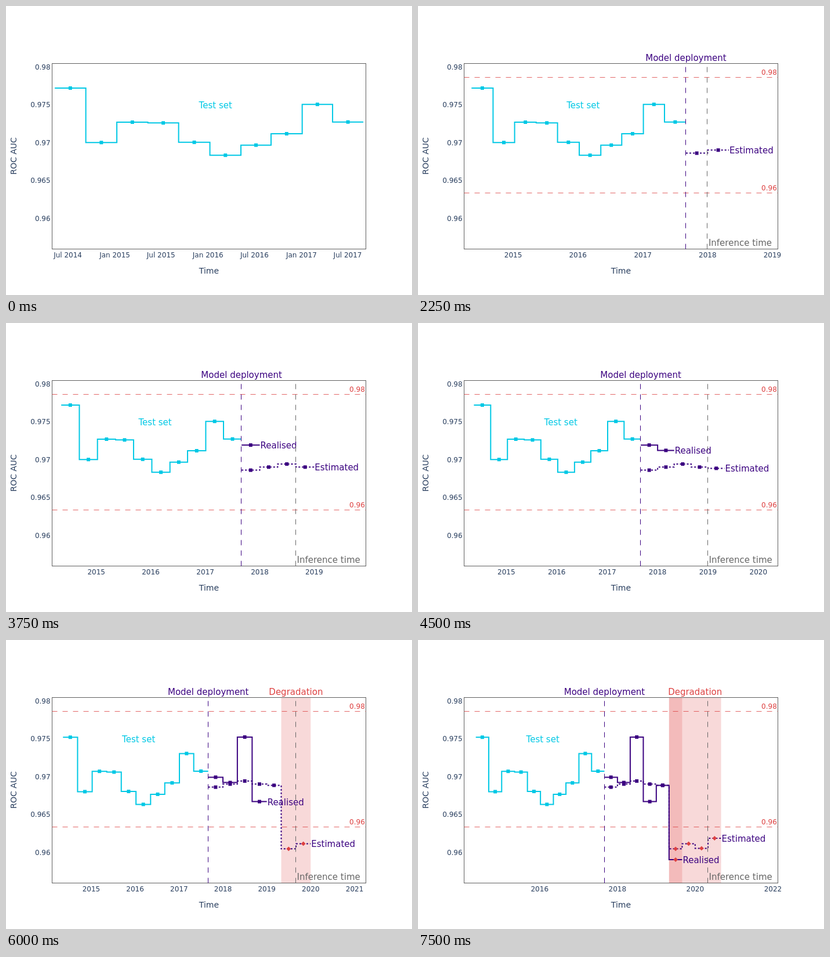
Animation of 700 by 500 pixels, one loop 9750 ms. Source, as an HTML page:

```html
<!DOCTYPE html>
<html lang="en">
<head>
<meta charset="utf-8">
<title>ROC AUC over time</title>
<style>
  html, body { margin: 0; width: 100%; height: 100%; overflow: hidden; background: #fff; }
  svg { display: block; width: 700px; height: 500px; }
  text { font-family: Verdana, "DejaVu Sans", sans-serif; white-space: pre; }
</style>
</head>
<body>
<svg id="chart" viewBox="0 0 700 500"></svg>
<script>
const CYAN = '#00c8e5', INDIGO = '#3b0280', RED = '#dd4040', GRAY = '#666', INK = '#2a3f5f';
const LOOP = 9750;
const STARTS = [0, 1500, 2250, 3000, 3750, 4500, 5250, 6000, 6750, 7500];
const BOX = { left: 79.5, right: 620.5, top: 99.5, bottom: 420.5 };

// Days since the start of 2015
const day = (year, month = 0) => (Date.UTC(year, month) - Date.UTC(2015, 0)) / 864e5;

// Chunk edges in days, chunk levels in pixels
const TEST_EDGES = [-235, -113.5, 8, 129.5, 250, 372.5, 494, 612, 734, 853, 973.5];
const TEST = [142, 236.2, 201, 202.3, 235.8, 258.2, 240.7, 221, 170.2, 200.7];
const LIVE_EDGES = Array.from({ length: 10 }, (_, i) => day(2017, 8 + 4 * i));
const ESTIMATED = [254.6, 249.3, 244, 249.3, 251.4, 361.3, 352.4, 360.4, 343];
const REALISED = [211.2, 220.4, 141.7, 253.4, 225.2, 353.8];
const SHIFT = 26.2;
const FIRST_BAD = 5;
const FIRST_DAY = -174.4, FIRST_X = 110.8;

function text(str, x, y, { size = 15, fill = INK, anchor = 'middle', extra = '' } = {}) {
  return `<text x="${x}" y="${y}" font-size="${size}" fill="${fill}" text-anchor="${anchor}" ${extra}>${str}</text>`;
}

function path(d, color, width, extra = '') {
  return `<path d="${d}" fill="none" stroke="${color}" stroke-width="${width}" ${extra}/>`;
}

const DASH = 'stroke-dasharray="9 9"';

function vertical(x, color) {
  const sharp = Math.floor(x - 0.3) + 0.5;
  return path(`M${sharp} ${BOX.bottom}V${BOX.top}`, color, 1, DASH);
}

function steps(x, edges, levels, color, { dotted = false, badFrom = Infinity } = {}) {
  let d = '', marks = '';
  levels.forEach((y, i) => {
    const a = x(edges[i]), b = x(edges[i + 1]), mid = (a + b) / 2;
    d += i ? `V${y}H${b}` : `M${a} ${y}H${b}`;
    marks += i >= badFrom
      ? `<path d="M${mid - 3.9} ${y}l3.9-3.9 3.9 3.9-3.9 3.9z" fill="${RED}"/>`
      : `<rect x="${mid - 3}" y="${y - 3}" width="6" height="6" fill="${color}"/>`;
  });
  return path(d, color, 2, dotted ? 'stroke-dasharray="3 3"' : '') + marks;
}

function band(x, count) {
  if (count <= FIRST_BAD) return '';
  const a = x(LIVE_EDGES[FIRST_BAD]), b = x(LIVE_EDGES[count]);
  return `<rect x="${a}" y="${BOX.top}" width="${b - a}" height="${BOX.bottom - BOX.top}" fill="${RED}" opacity=".2"/>`;
}

function endLabel(str, x, count, levels) {
  return text(str, x(LIVE_EDGES[count]) + 1, levels[count - 1] + 5.9, { fill: INDIGO, anchor: 'start' });
}

function scaleFor(n) {
  const fixed = [0.4402, 0.3346, 0.3058];
  return fixed[n] || 389.2 / (LIVE_EDGES[n - 1] - FIRST_DAY);
}

function axes(x, n) {
  let out = '';
  for (let i = 0; i < 5; i++) {
    out += text(String(+(0.98 - i * 0.005).toFixed(3)), 76.6, 109.8 + i * 65.45, { size: 12, anchor: 'end' });
  }
  const gap = n === 0 ? 6 : n === 9 ? 24 : 12;
  for (let m = 0; m <= 120; m += gap) {
    const px = x(day(2014, m));
    if (px < BOX.left || px > BOX.right) continue;
    const year = 2014 + Math.floor(m / 12);
    const name = n ? year : (m % 12 ? 'Jul ' : 'Jan ') + year;
    out += text(name, px, 435, { size: 12 });
  }
  out += text('Time', 350, 463, { size: 14 });
  out += text('ROC AUC', 0, 0, { size: 14, extra: 'transform="translate(17.6 259.5) rotate(-90)"' });
  return out;
}

// n is the number of estimated chunks on show
function render(n) {
  const scale = scaleFor(n);
  const x = d => FIRST_X + (d - FIRST_DAY) * scale;
  const shift = n >= 6 ? SHIFT : 0;
  const moved = levels => levels.map(y => y + shift);
  const known = Math.max(0, n - 3);
  const estimated = ESTIMATED.slice(0, n);
  const realised = moved(REALISED.slice(0, known));

  let out = '<rect width="700" height="500" fill="#fff"/>' + band(x, n) + band(x, known);
  out += `<rect x="${BOX.left}" y="${BOX.top}" width="541" height="321" fill="none" stroke="#444" stroke-opacity=".85"/>`;
  out += axes(x, n);
  out += steps(x, TEST_EDGES, moved(TEST), CYAN);
  out += text('Test set', x(394.5), 177, { fill: CYAN });

  if (n) {
    const start = x(LIVE_EDGES[0]), now = x(LIVE_EDGES[n - 1]);
    out += steps(x, LIVE_EDGES, estimated, INDIGO, { dotted: true, badFrom: FIRST_BAD });
    out += endLabel('Estimated', x, n, estimated);
    if (known) {
      out += steps(x, LIVE_EDGES, realised, INDIGO, { badFrom: FIRST_BAD });
      out += endLabel('Realised', x, known, realised);
    }
    [['0.98', 123.5], ['0.96', 323.5]].forEach(([label, y]) => {
      out += path(`M${BOX.left} ${y}H${BOX.right}`, RED, 1, DASH + ' opacity=".8"');
      out += text(label, 618.8, y - 4.6, { size: 12, fill: RED, anchor: 'end' });
    });
    out += vertical(now, GRAY) + vertical(start, INDIGO);
    out += text('Model deployment', start, 95, { fill: INDIGO });
    out += text('Inference time', now + 1.6, 415, { fill: GRAY, anchor: 'start' });
    if (n > FIRST_BAD) {
      out += text('Degradation', (x(LIVE_EDGES[FIRST_BAD]) + x(LIVE_EDGES[n])) / 2, 95, { fill: RED });
    }
  }
  return out;
}

const chart = document.getElementById('chart');
const begin = performance.now();
let shown = -1;

function tick() {
  const t = (performance.now() - begin) % LOOP;
  const n = STARTS.filter(s => s <= t).length - 1;
  if (n !== shown) {
    shown = n;
    chart.innerHTML = render(n);
  }
  requestAnimationFrame(tick);
}
tick();
</script>
</body>
</html>
```
